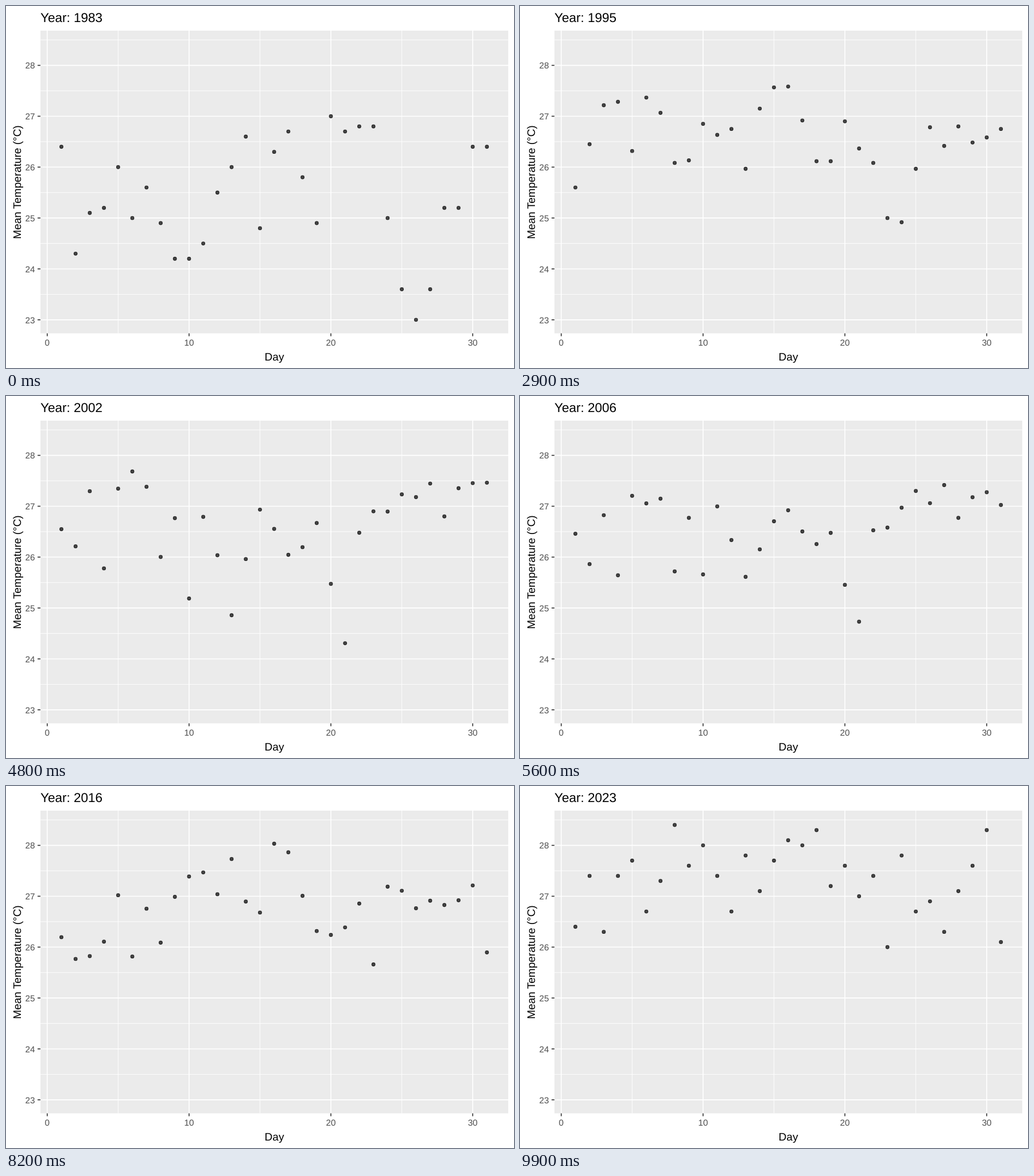
Write an HTML page that moves like this. It is 885 px wide and 632 px high and loops after 10000 ms.

```html
<!DOCTYPE html>
<html lang="en">
<head>
<meta charset="utf-8">
<title>Daily mean temperature</title>
<style>
  html, body { margin: 0; width: 100%; height: 100%; overflow: hidden; background: #fff; }
  svg { display: block; width: 885px; height: 632px; }
  text { font: 19px "Liberation Sans", Arial, sans-serif; text-rendering: geometricPrecision; }
  #title { font-size: 22.5px; }
  .label { font-size: 15.2px; fill: #4d4d4d; }
  .minor { stroke: #fff; stroke-width: 0.9; }
  .major { stroke: #fff; stroke-width: 1.6; }
  .tick { stroke: #333; stroke-width: 1.6; }
  .dot { fill: rgba(0, 0, 0, 0.7); stroke: rgba(0, 0, 0, 0.7); stroke-width: 1.1; }
</style>
</head>
<body>
<svg id="chart" viewBox="0 0 885 632">
  <rect x="60" y="43" width="815" height="528.5" fill="#ebebeb"/>
  <text id="title" x="60" y="28">Year: 1983</text>
  <text x="467.5" y="619" text-anchor="middle">Day</text>
  <text transform="translate(25.5 307.5) rotate(-90)" text-anchor="middle">Mean Temperature (°C)</text>
</svg>
<script>
  const STEP_MS = 100, STEPS = 100, DAYS = 31;
  const FIRST_YEAR = 1983, LAST_YEAR = 2023;
  const panel = { left: 60, right: 875, top: 43, bottom: 571.5 };
  const chart = document.getElementById("chart");
  const title = document.getElementById("title");

  const xOf = day => 71.8 + 24.71 * day;
  const yOf = temp => 103.6 + 88.85 * (28 - temp);

  // Observed years, each tied to the step at which it is reached.
  const keys = [];
  const addYear = (step, temps) => keys.push({ step, temps });

  addYear(0, [26.4, 24.3, 25.1, 25.2, 26, 25, 25.6, 24.9, 24.2, 24.2,
    24.5, 25.5, 26, 26.6, 24.8, 26.3, 26.7, 25.8, 24.9, 27,
    26.7, 26.8, 26.8, 25, 23.6, 23, 23.6, 25.2, 25.2, 26.4, 26.4]);
  addYear(25, [25.4, 26.5, 27.2, 27.6, 26.1, 27.3, 27, 26.1, 26, 27.2,
    26.6, 26.9, 26.2, 27.4, 27.7, 27.8, 27.1, 26.1, 26, 27.2,
    26.8, 26, 24.6, 24.5, 25.7, 26.7, 26.2, 26.8, 26.3, 26.4, 26.6]);
  addYear(49, [26.6, 26.2, 27.3, 25.7, 27.4, 27.7, 27.4, 26, 26.8, 25.1,
    26.8, 26, 24.8, 25.9, 26.9, 26.5, 26, 26.2, 26.7, 25.4,
    24.2, 26.5, 27, 27, 27.3, 27.2, 27.5, 26.8, 27.4, 27.5, 27.5]);
  addYear(74, [26.1, 25, 25.6, 25.5, 26.7, 25.4, 26.5, 25, 26.7, 27.1,
    27.5, 27.2, 27.7, 26.8, 26.2, 28, 27.8, 26.4, 25.9, 25.6,
    26.1, 26.6, 25.5, 26.9, 27.3, 26.7, 27.2, 26.7, 26.6, 26.7, 25.8]);
  addYear(99, [26.4, 27.4, 26.3, 27.4, 27.7, 26.7, 27.3, 28.4, 27.6, 28,
    27.4, 26.7, 27.8, 27.1, 27.7, 28.1, 28, 28.3, 27.2, 27.6,
    27, 27.4, 26, 27.8, 26.7, 26.9, 26.3, 27.1, 27.6, 28.3, 26.1]);

  function add(tag, attrs, text) {
    const el = document.createElementNS(chart.namespaceURI, tag);
    for (const name in attrs) el.setAttribute(name, attrs[name]);
    if (text !== undefined) el.textContent = text;
    return chart.appendChild(el);
  }

  const line = (kind, x1, y1, x2, y2) => add("line", { class: kind, x1, y1, x2, y2 });
  const vline = (kind, x) => line(kind, x, panel.top, x, panel.bottom);
  const hline = (kind, y) => line(kind, panel.left, y, panel.right, y);

  for (let day = 5; day < 30; day += 10) vline("minor", xOf(day));
  for (let temp = 23.5; temp < 29; temp++) hline("minor", yOf(temp));

  for (let temp = 23; temp <= 28; temp++) {
    const y = yOf(temp);
    hline("major", y);
    line("tick", panel.left - 5, y, panel.left, y);
    add("text", { class: "label", x: 50.5, y: y + 5.7, "text-anchor": "end" }, temp);
  }
  for (let day = 0; day <= 30; day += 10) {
    const x = xOf(day);
    vline("major", x);
    line("tick", x, panel.bottom, x, panel.bottom + 5);
    add("text", { class: "label", x, y: 593.3, "text-anchor": "middle" }, day);
  }

  const dots = Array.from({ length: DAYS }, (_, i) =>
    add("circle", { class: "dot", cx: xOf(i + 1), r: 2.9 }));

  function draw() {
    const step = Math.floor(performance.now() / STEP_MS) % STEPS;
    const next = Math.max(1, keys.findIndex(key => key.step >= step));
    const a = keys[next - 1], b = keys[next];
    const mix = (step - a.step) / (b.step - a.step);

    dots.forEach((dot, i) => {
      const temp = a.temps[i] + mix * (b.temps[i] - a.temps[i]);
      dot.setAttribute("cy", yOf(temp));
    });
    const year = FIRST_YEAR + step / (STEPS - 1) * (LAST_YEAR - FIRST_YEAR);
    title.textContent = "Year: " + Math.round(year);
    requestAnimationFrame(draw);
  }
  draw();
</script>
</body>
</html>
```
